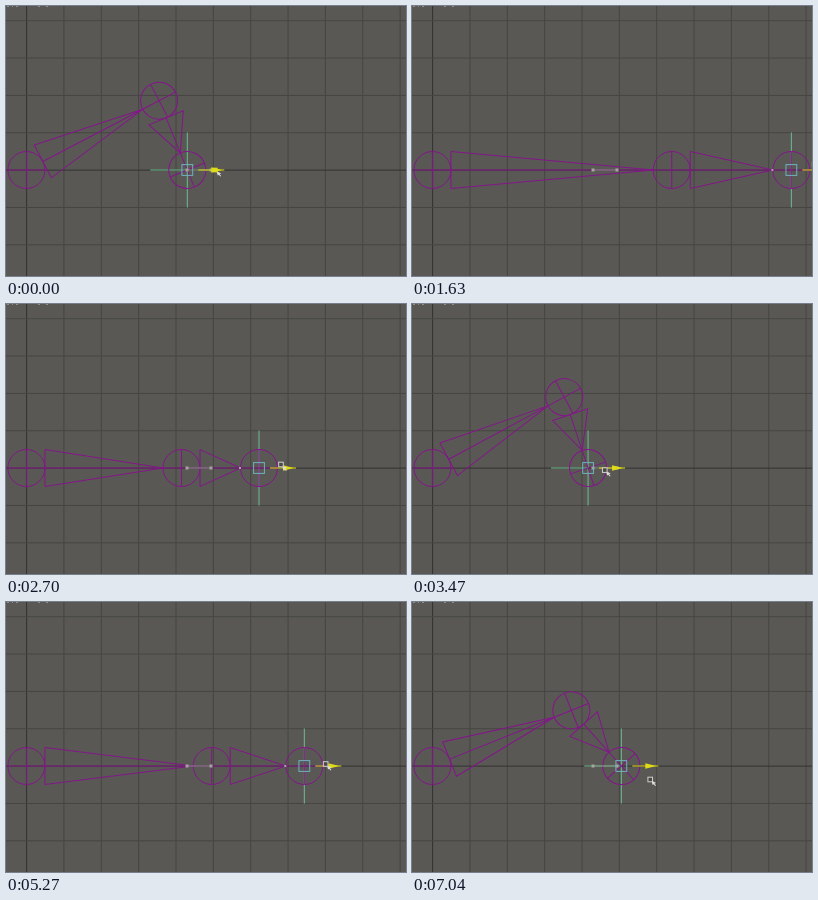
These frames come from a looping animation (400 by 270 pixels, 7170 ms). An HTML page with a canvas:

```html
<!DOCTYPE html>
<html lang="en">
<head>
<meta charset="utf-8">
<title>Stretchy two-bone IK</title>
<style>
  html, body { margin: 0; width: 100%; height: 100%; overflow: hidden; background: #595855; }
  canvas { display: block; }
</style>
</head>
<body>
<canvas id="stage" width="400" height="270"></canvas>
<script>
const ctx = document.getElementById('stage').getContext('2d');

const LOOP = 7170, LAST = 7040, FPS = 30;
const ROOT = { x: 20.4, y: 164 };
const UPPER = 149.7, LOWER = 74.8, R = 18.5;
const CELL = 37.35;
const PURPLE = '#84158a', GREEN = '#6cbd90', CYAN = '#70b0bf', YELLOW = '#dfdb16';

// [time in ms, x of the dragged handle]
const HANDLE = [
  [0, 181.3], [730, 258], [1470, 350], [1630, 379], [1830, 394], [2200, 335],
  [2510, 217], [2700, 253], [2790, 261], [2940, 243], [3310, 143], [3670, 225],
  [4340, 104.7], [5140, 275], [5270, 299], [5640, 384], [5870, 366],
  [6170, 295], [6450, 230], [6610, 244], [LAST, 209.3]
];
// [time in ms, y of the mouse]
const MOUSE_Y = [
  [0, 164], [1630, 158.5], [2700, 160.5], [4340, 171.5],
  [5270, 162], [6170, 164], [LAST, 177.5]
];

// Monotone cubic interpolation: smooth, without overshoot at the turns.
function curve(keys) {
  const slope = keys.slice(1).map((k, i) => (k[1] - keys[i][1]) / (k[0] - keys[i][0]));
  const tangent = keys.map((_, i) => {
    const a = slope[i - 1], b = slope[i];
    return a * b > 0 ? 2 * a * b / (a + b) : 0;
  });
  return t => {
    if (t <= 0) return keys[0][1];
    const i = keys.findIndex(k => k[0] > t) - 1;
    if (i < 0) return keys[keys.length - 1][1];
    const span = keys[i + 1][0] - keys[i][0];
    const u = (t - keys[i][0]) / span, v = 1 - u;
    return v * v * (1 + 2 * u) * keys[i][1] + u * u * (3 - 2 * u) * keys[i + 1][1]
      + span * u * v * (v * tangent[i] - u * tangent[i + 1]);
  };
}
const handleX = curve(HANDLE), mouseY = curve(MOUSE_Y);

function line(color, ...p) {
  ctx.strokeStyle = color;
  ctx.beginPath();
  for (let i = 0; i < p.length; i += 2) ctx.lineTo(p[i], p[i + 1]);
  ctx.stroke();
}

function rect(color, x, y, w, h) {
  ctx.fillStyle = color;
  ctx.fillRect(x, y, w, h);
}

function box(color, x, y, half) {
  ctx.strokeStyle = color;
  ctx.strokeRect(x - half, y - half, 2 * half, 2 * half);
}

function grid() {
  rect('#595855', 0, 0, 400, 270);
  for (let i = 0; i < 11; i++) {
    const x = 20.6 + i * CELL;
    line(i ? '#464542' : '#333230', x, 0, x, 270);
  }
  for (let i = -4; i < 3; i++) {
    const y = 164.1 + i * CELL;
    line(i ? '#464542' : '#333230', 0, y, 400, y);
  }
  // bottoms of a caption cut off by the top edge
  for (const [x, w] of [[1, 2], [6, 1], [10, 2], [32, 2], [40, 2]])
    rect('#8f8e8a', x, 0, w, 1);
}

function joint(p, angle) {
  ctx.save();
  ctx.translate(p.x, p.y);
  ctx.rotate(angle);
  ctx.strokeStyle = PURPLE;
  ctx.beginPath();
  ctx.arc(0, 0, R, 0, 7);
  ctx.stroke();
  line(PURPLE, -R, 0, R, 0);
  line(PURPLE, 0, -R, 0, R);
  ctx.restore();
}

function bone(from, angle, length) {
  ctx.save();
  ctx.translate(from.x, from.y);
  ctx.rotate(angle);
  const tip = length - R;
  line(PURPLE, tip, 0, R, -R, R, R, tip, 0, R, 0);
  ctx.restore();
}

// Bends while the handle is within reach, otherwise stretches both bones.
function solve(x) {
  const d = x - ROOT.x;
  const k = Math.max(1, d / (UPPER + LOWER));
  const a = UPPER * k, b = LOWER * k;
  const along = (d * d + a * a - b * b) / (2 * d);
  const up = Math.sqrt(Math.max(0, a * a - along * along));
  return {
    a, b, straight: k > 1,
    elbow: { x: ROOT.x + along, y: ROOT.y - up },
    first: Math.atan2(-up, along),
    second: Math.atan2(up, d - along)
  };
}

function restMarks() {
  line('#8c9488', 181, 164, 205, 164);
  for (const x of [181, 205]) rect('#a2a69c', x - 1.5, 162.5, 3, 3);
}

function arrow(x, y) {
  line(YELLOW, x + 11, y, x + 37, y);
  ctx.fillStyle = YELLOW;
  ctx.beginPath();
  ctx.moveTo(x + 24, y - 2.7);
  ctx.lineTo(x + 35, y);
  ctx.lineTo(x + 24, y + 2.7);
  ctx.fill();
}

function cursor(x, y, pressed) {
  ctx.fillStyle = '#dededa';
  ctx.beginPath();
  ctx.moveTo(x + 1, y + 1);
  ctx.lineTo(x + 6, y + 3.5);
  ctx.lineTo(x + 4.3, y + 4);
  ctx.lineTo(x + 5.8, y + 6);
  ctx.lineTo(x + 5, y + 6.5);
  ctx.lineTo(x + 3.5, y + 4.7);
  ctx.lineTo(x + 2.5, y + 5.5);
  ctx.fill();
  rect(pressed ? '#4a4946' : YELLOW, x - 2.3, y - 2.3, 4.6, 4.6);
  if (pressed) box('#d0d0cc', x, y, 2.3);
}

function draw(t) {
  const x = handleX(t), y = ROOT.y;
  const arm = solve(x), end = { x, y };
  ctx.lineWidth = 1;
  grid();
  if (!arm.straight) line(GREEN, x - 37, y, x, y);
  line(GREEN, x, y - 37.5, x, y + 37.5);

  joint(ROOT, 0);
  bone(ROOT, arm.first, arm.a);
  joint(arm.elbow, arm.first);
  bone(arm.elbow, arm.second, arm.b);
  joint(end, arm.second);

  restMarks();
  if (arm.straight) rect('#a3a89f', x - 20, y - 1, 2, 2);
  box(CYAN, x, y, 5.4);
  arrow(x, y);
  // the pointer trails the handle slightly
  cursor(handleX(t - 35) + 28, mouseY(t), t > 0);
}

const start = performance.now();
function tick() {
  const t = (performance.now() - start) % LOOP;
  const step = Math.floor((t + 4) * FPS / 1000);
  draw(Math.min(LAST, step * 1000 / FPS));
  requestAnimationFrame(tick);
}
tick();
</script>
</body>
</html>
```
